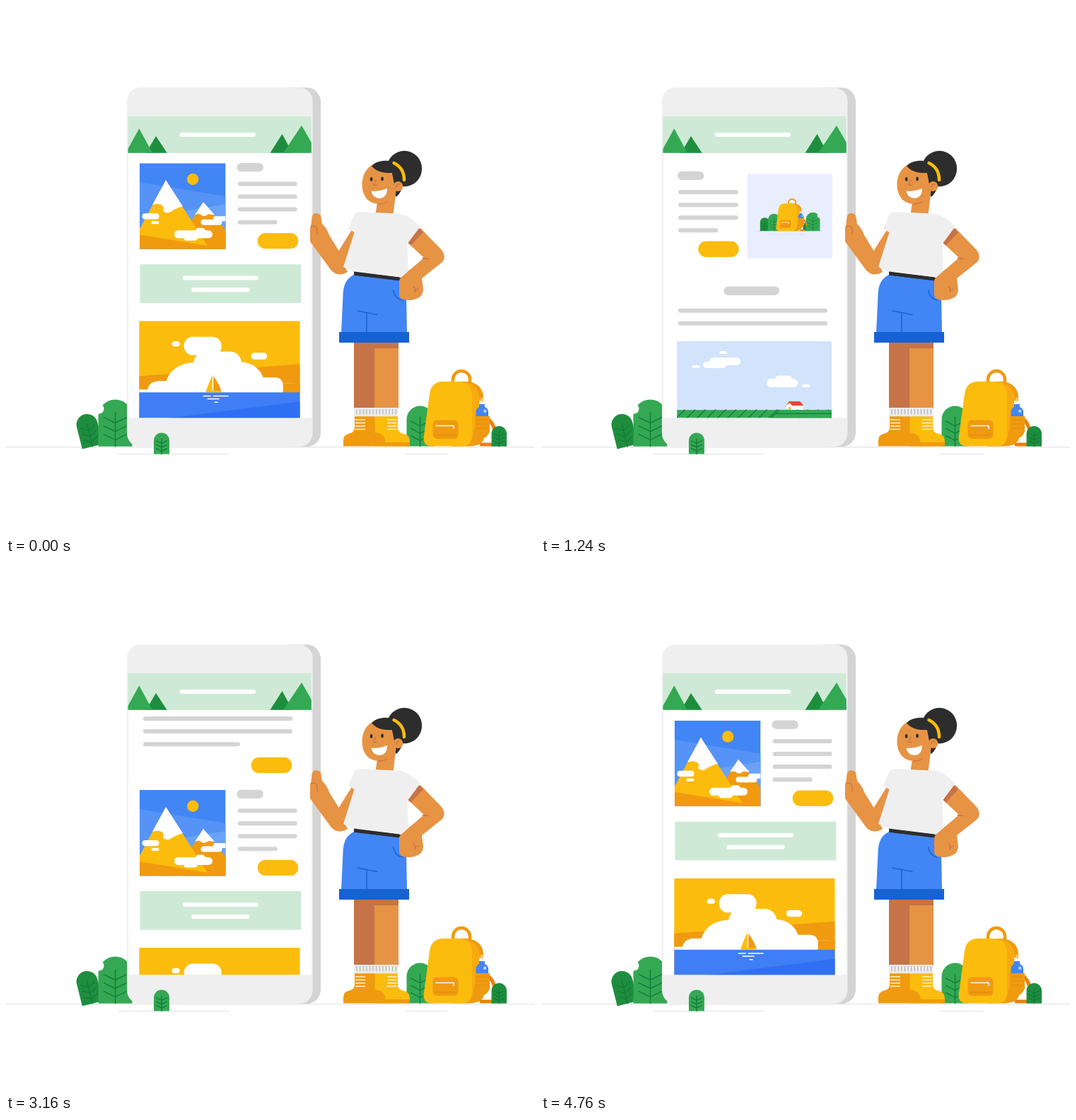
An HTML page for the animation above (4800 ms loop, 748 by 748 pixels).

```html
<!DOCTYPE html>
<html lang="en">
<head>
<meta charset="utf-8">
<title>Scrolling phone</title>
<style>
html, body { margin: 0; width: 100%; height: 100%; overflow: hidden; background: #fff; }
svg { display: block; width: 100vw; height: 100vh; }
</style>
</head>
<body>
<svg id="stage" viewBox="0 0 748 748" xmlns="http://www.w3.org/2000/svg"></svg>
<script>
const C = {
  yellow: '#fbbc0e', orange: '#f09a10', green: '#34a853', dark: '#1e8e3e', vein: '#137a39',
  blue: '#4285f4', navy: '#1762d3', mint: '#ceead6', grey: '#d4d4d4', pale: '#efefef',
  skin: '#e69344', shade: '#c67348', black: '#2d2d2d', white: '#fff'
};
const LOOP = 4800, LENGTH = 1366.2;

const rect = (x, y, w, h, f, r = 0) =>
  `<rect x="${x}" y="${y}" width="${w}" height="${h}" rx="${r}" fill="${f}"/>`;
const pill = (x, y, w, h, f = C.grey) => rect(x, y, w, h, f, h / 2);
const path = (d, f) => `<path d="${d}" fill="${f}"/>`;
const line = (d, s, w = 1.3) =>
  `<path d="${d}" fill="none" stroke="${s}" stroke-width="${w}" stroke-linecap="round" stroke-linejoin="round"/>`;
const oval = (x, y, rx, ry, f) => `<ellipse cx="${x}" cy="${y}" rx="${rx}" ry="${ry}" fill="${f}"/>`;
const group = (transform, s) => `<g transform="${transform}">${s}</g>`;
const clip = (id, w, h, s) =>
  `<clipPath id="${id}"><rect width="${w}" height="${h}"/></clipPath><g clip-path="url(#${id})">${s}</g>`;

const textLine = (x, y, w, f = C.grey) => pill(x, y - 3, w, 6, f);
const button = (x, y) => pill(x, y, 57.5, 22.3, C.yellow);

function leaf(x, y, w, h, f, sw = 1.3) {
  const r = w / 2, m = x + r, b = y + h;
  let v = `M${m} ${b}V${y + h * .28}`;
  for (const k of [.5, .68, .86]) {
    const q = y + h * k;
    v += `M${m - w * .34} ${q - h * .12}L${m} ${q}L${m + w * .34} ${q - h * .12}`;
  }
  return path(`M${x} ${b}V${y + r}a${r} ${r} 0 0 1 ${w} 0V${b}Z`, f) + line(v, C.vein, sw);
}

function banner(x, y) {
  return rect(x, y, 228, 54.8, C.mint) +
    textLine(x + 60.5, y + 19.2, 107, C.white) + textLine(x + 72.8, y + 36, 82.5, C.white);
}

function paragraph(x, y, w, last, rows) {
  let s = '';
  for (let i = 0; i < rows; i++) s += textLine(x, y + i * 18.05, i < rows - 1 ? w : last);
  return s;
}

function article(y) {
  return pill(196, y, 78, 12.3) + paragraph(194, y + 29.8, 211, 137, 4) + button(346.7, y + 102.6);
}

function mountains() {
  return clip('mount', 121.3, 121.3,
    rect(0, 0, 122, 122, C.blue) +
    path('M0 27L122 47V122H0Z', '#5593f6') +
    path('M60 68L122 58V122H60Z', '#6aa2f8') +
    path('M90 55L68 90V122H122V95Z', C.orange) +
    path('M90 55L78 73Q84 70 88 74Q93 76 97 72L106 73Z', C.white) +
    path('M37 24L-6 104L20 122H99Z', C.yellow) +
    path('M0 101L122 121V122H0Z', C.orange) +
    path('M37 24L18 59Q26 56 31 59Q36 62 33 67Q38 73 45 68Q51 64 61 61Z', C.white) +
    oval(75.2, 22.7, 8.2, 8.2, C.yellow) +
    pill(3.5, 71, 24, 8.2, C.white) + pill(16.5, 82, 11, 4, C.white) +
    pill(104, 75, 24, 7, C.white) + pill(86.5, 79.5, 30, 8, C.white) +
    pill(49, 95, 54, 11, C.white) + pill(79, 91.5, 14, 9, C.white) + pill(62, 101, 20, 8.5, C.white));
}

function sea() {
  return clip('sea', 227.3, 152,
    rect(0, 0, 228, 152, C.yellow) +
    path('M0 78L228 61V102H0Z', C.orange) +
    pill(46.5, 29, 11, 7, C.white) + pill(158.5, 45, 22.5, 9.5, C.white) +
    rect(63.5, 22.5, 53, 26, C.white, 12.5) +
    rect(77, 43.2, 68, 45, C.white, 17) +
    path('M38 102V90C40 70 58 59 78 59L144 58C162 59 174 70 177 86V102Z', C.white) +
    path('M12 102V97Q14 86 27 85H40V80H186Q201 78 203 88H220Q227 92 227 102Z', C.white) +
    path('M203 88H228V102H203Z', C.orange) +
    path('M203 87Q204 94 203 102H0V97H12', C.white) +
    rect(0, 101, 228, 52, '#3f7ef4') +
    path('M45 137L228 114V152H0V141Z', '#2f70f3') +
    path('M103.5 76L94 100H103.5Z', C.yellow) + path('M105 78Q114 90 116.5 100H105Z', C.orange) +
    path('M94 98.5H117L115 101H96Z', C.yellow) +
    line('M91 106.3h10M105 106.3h21M97 110.3h16M107 115h4', C.white, 1.5));
}

function farm() {
  let left = '', right = '';
  for (let i = 0; i < 18; i++) left += `M${-38 + i * 14.5} 146l49 -49`;
  for (let i = 0; i < 7; i++) right += `M${139 - i * 6.4} ${102.5 + i * 6.4}H220`;
  return clip('farm', 218.8, 146,
    rect(0, 0, 220, 146, '#d2e3fc') +
    pill(46, 23, 44, 11, C.white) + pill(37, 29, 33, 9, C.white) +
    pill(60, 14, 11, 4, C.white) + pill(21.5, 34, 11, 4, C.white) +
    pill(127, 53, 44, 12, C.white) + pill(138.5, 48.5, 25, 12, C.white) + pill(177, 61, 11, 4, C.white) +
    rect(155, 89, 23.5, 9, C.white) + path('M154 92L158.5 85H174L179 91H163L159 87Z', '#ea4335') +
    rect(158, 93, 3, 4.5, C.yellow) +
    rect(0, 97.3, 220, 50, C.green) + line(left, C.vein) +
    path('M144.5 97.3L95 146.5H220V97.3Z', C.green) +
    line('M144.5 97.3L95 146.5' + right, C.vein));
}

function bag() {
  return line('M632 533V528a12 12 0 0 1 24 0V533', C.orange, 4.5) +
    line('M676 580Q690 588 691 602M672 620H686', '#e8820c', 5) +
    path('M634 531H652Q673 533 675 552L676 580L684 581V601Q682 608 676 611Q673 622 656 622.5H630Z', C.orange) +
    path('M648 531Q669 536 670 556L667 580L659 612Z', '#f7ab10') +
    path('M618 531H643Q657 533 659 549V609Q658 622 645 622.5H600Q590 621 590.5 611L599 548Q602 531 618 531Z', C.yellow) +
    rect(603.5, 585.5, 36, 26.5, C.orange, 6) +
    line('M608 593.5H633V597.5', C.white, 1.6) +
    line('M607 607H636', '#dd860b', 1) +
    rect(669, 558, 8, 9, '#f5f5f5', 1) + rect(671, 553.5, 4, 6, '#f3c77b', 2) +
    path('M669 563H677V567Q682 569 682 574V581H664.5V574Q664.5 569 669 567Z', C.blue) +
    oval(677.2, 572.8, 2.3, 2.3, '#b9d2fb') +
    path('M663 580H684V601Q681 608 675 608H663Z', C.orange) +
    line('M666 585H681M666 591H681M666 597H681', '#dd860b', .8);
}

function packCard() {
  return rect(292, 863.2, 119.8, 119.4, '#e8eefe') +
    leaf(309.8, 925, 13, 19, C.dark, .7) + leaf(321, 919.5, 17, 24.5, C.green, .7) +
    leaf(370.5, 931.5, 12, 12.5, C.dark, .7) + leaf(374.5, 917.5, 20, 26.5, C.green, .7) +
    oval(393.5, 922.5, 2.8, 2.8, '#e8eefe') +
    group('translate(81.4 679.4) scale(.425)', bag()) +
    line('M305 944.4H396M320 948.5H372', '#d6dcea', .8);
}

function feed() {
  return group('translate(189 222.3)', mountains()) +
    pill(326.5, 222, 37.3, 12.3) + paragraph(327.7, 251.5, 84, 56, 4) + button(355.7, 321) +
    banner(189.4, 365.2) +
    group('translate(188.2 445.3)', sea()) +
    article(624.5) +
    banner(190, 775.2) +
    pill(193, 859.5, 37.5, 12.3) + paragraph(194.3, 889, 84.5, 56, 4) + button(222.3, 958.4) +
    packCard() +
    pill(258.4, 1022.4, 78.6, 12.3) + paragraph(194, 1056.6, 211, 211, 2) +
    group('translate(192.2 1099.7)', farm()) +
    paragraph(194, 1270.8, 211, 137, 2) + button(346.7, 1314.8) +
    banner(187.2, 1355) +
    article(1439.7 );
}

function phone() {
  return rect(380, 115.3, 65, 508, C.grey, 20) +
    rect(171, 115.3, 262.5, 508, C.pale, 19) +
    rect(173, 156, 259, 426.3, C.white) +
    `<clipPath id="screen"><rect x="173" y="207.5" width="259" height="374.8"/></clipPath>
     <g clip-path="url(#screen)"><g id="scroll"><g id="feed">${feed()}</g><use href="#feed" y="${LENGTH}"/></g></g>` +
    rect(172.5, 156, 259.3, 52, C.mint) +
    path('M212 184L198 207.8H227.7Z', C.dark) + path('M188.3 173.3L172.5 202V207.8H207Z', C.green) +
    path('M390.5 181L373.5 207.8H405Z', C.dark) + path('M418 169L392 207.8H431.8V193Z', C.green) +
    textLine(245.5, 182, 107.5, C.white);
}

function legs() {
  let ribs = '';
  for (let x = 496; x < 553; x += 4.6) ribs += `M${x} 570.5v6.5`;
  return rect(492, 470, 29, 100, C.shade) + rect(521, 470, 34, 100, C.skin) + rect(521, 476, 34, 8, C.shade) +
    path('M521 579H554V598Q556 604 563 605Q571 607 571 616V622.5H521Z', C.yellow) +
    path('M536 617H571V622.5H536Z', C.orange) +
    path('M493 579H521.5V603Q536 605 536.5 616V622.5H477V614Q477 606 487 604Q494 602 493 592Z', C.orange) +
    line('M494.5 585h13M494.5 589.5h13M494.5 594h13M494.5 598.5h13M539.5 585h12.5M539.5 589.5h12.5M539.5 594h12.5M539.5 598.5h12.5', '#fff3cf', 1.5) +
    rect(492, 568, 62.5, 12.3, '#ebebeb') + line(ribs, '#a9a9a9', 1);
}

function head() {
  return oval(563.3, 230, 24.8, 25.3, C.black) +
    path('M517 226C526 217 547 216 556 226C566 237 564 259 552 270L540 255L530 230Z', C.black) +
    path('M526 268L522.5 295H547.5L552 258Z', C.skin) +
    path('M519 224C508 230 503 242 503.5 254C504 269 513 279.5 526 279.5C541 279 550 269 551 254L546 236C535 235 525 232 519 224Z', C.skin) +
    path('M517 226Q525 237 546 236L549 252L556 247L552 226Q535 214 517 226Z', C.black) +
    line('M548.5 222Q563 229 563 246', C.yellow, 4.5) +
    oval(554.5, 255, 6.8, 7, C.skin) + line('M552 256Q553 251 557 252', C.shade, 1.2) +
    oval(516.6, 244.8, 1.8, 2.9, C.black) + oval(532, 244.3, 1.8, 2.9, C.black) +
    line('M523 246L519.5 252Q521 254 524 253.5', C.shade) +
    path('M516.5 261.5Q528 262.5 539 258Q539 271 528 272Q518 271 516.5 261.5Z', C.white) +
    line('M527 280Q534 280 539 277', C.shade);
}

function person() {
  return legs() + head() +
    path('M430 333V314C433 308 431 297 435 294Q440 291 445 296L447 308Q454 315 457 324L470.5 346L490 315L496 320L479 368L483 376Q470 384 460 374Z', C.skin) +
    line('M431 312Q439 309 440 316V323', C.shade) +
    path('M494 379C480 385 477 396 476.5 410L474 462H567L566 410L558 385Z', C.blue) +
    rect(471, 461, 99, 15, C.navy) +
    line('M497 431L525 436.5M510 434V461M547.5 402Q550 414 560 416', C.navy, 1.4) +
    path('M492 375L558 383V388.5L492 380.5Z', C.black) +
    path('M586 314L616 345Q623 354 617 362L588 385L590 401Q589 410 584 412Q574 418 562 415Q556 414 556 407V389Q557 384 562 381L591 356L568.5 335Z', C.skin) +
    path('M584 314L590 320L572.5 338.5L568.5 335Z', C.shade) +
    line('M589 356.5L597 357.5M576 397Q580 400 578 405M578 402L583 400', C.shade) +
    path('M500 291.3L556 293.5Q573 297 585.5 312L567.5 335L569 383L558 384L491 376L477 369L492.5 320L484 315L491 298Q494 291 500 291.3Z', C.pale) +
    path('M556 389Q557 384 562 381L572 372V400H556Z', C.skin) +
    path('M492 375.5L556 383.5V388.3L492 380.5Z', C.black);
}

document.getElementById('stage').innerHTML =
  line('M0 623.8H748M159 633.8H315M565 633.8H626', '#e9e9e9', 1.4) +
  group('rotate(-14 118 622)', leaf(107, 577, 30, 47, C.dark)) +
  leaf(130.5, 556.5, 48, 66.3, C.green) +
  oval(132, 569.5, 6.5, 7, C.white) +
  phone() +
  leaf(209, 603.5, 22, 30, C.green) +
  leaf(566.5, 565.5, 38, 57, C.green) +
  bag() +
  leaf(686.5, 594, 21.5, 28.8, C.dark) +
  person();

// time, scroll offset, speed in px per ms
const KEYS = [
  [0, 0, 0], [85, .5, .01], [389, 66, .675], [554, 319, 1.81], [720, 492, .613],
  [1240, 625.7, .083], [1660, 636.5, 0], [1760, 636.5, 0], [2080, 645.2, .081],
  [2405, 712, .418], [2709, 1001, 1.12], [2760, 1053.2, .904], [3600, 1324.2, .11],
  [4760, 1365.7, .005], [LOOP, LENGTH, 0]
];

function offset(t) {
  const i = KEYS.findIndex(k => k[0] > t);
  const [t0, p0, v0] = KEYS[i - 1], [t1, p1, v1] = KEYS[i];
  const h = t1 - t0, u = (t - t0) / h, w = 1 - u;
  return w * w * ((1 + 2 * u) * p0 + u * h * v0) + u * u * ((3 - 2 * u) * p1 - w * h * v1);
}

const scroll = document.getElementById('scroll');
const start = performance.now();
function draw() {
  const t = (performance.now() - start) % LOOP;
  scroll.setAttribute('transform', `translate(0 ${(-offset(t)).toFixed(2)})`);
  requestAnimationFrame(draw);
}
draw();
</script>
</body>
</html>
```
